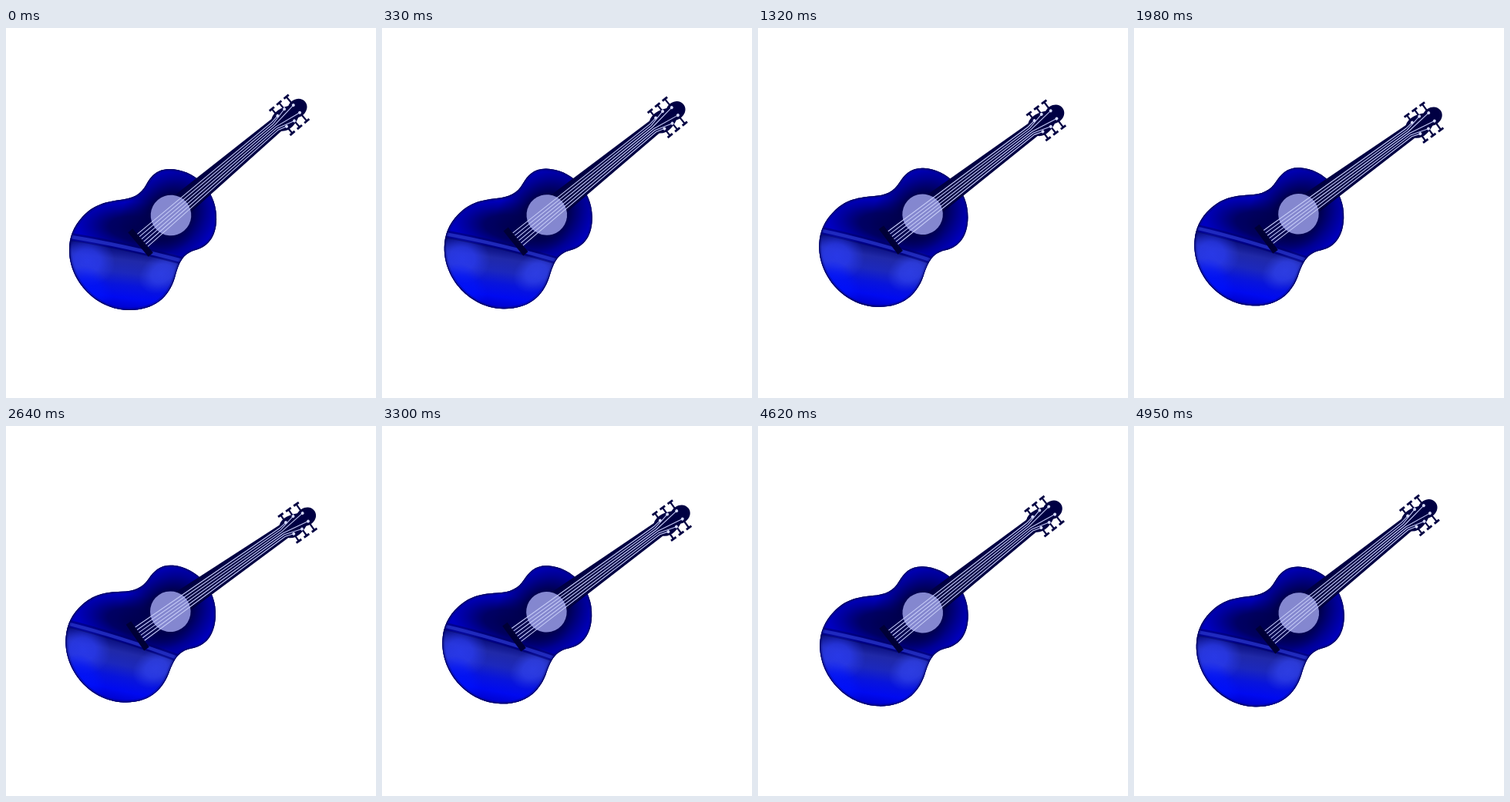
Write an HTML page with a canvas that moves like this. It is 480x480 px and loops after 5280 ms.

```html
<!DOCTYPE html>
<html lang="en">
<head>
<meta charset="utf-8">
<title>Swaying guitar</title>
<style>
html, body { margin: 0; width: 100%; height: 100%; overflow: hidden; background: #fff; }
canvas { display: block; width: 480px; height: 480px; }
</style>
</head>
<body>
<canvas id="stage" width="480" height="480"></canvas>
<script>
const ctx = document.getElementById('stage').getContext('2d');
const STEP = 330, STEPS = 16;
const PIVOT = { x: 238, y: 234 };
const HOLE = { x: 214, y: 243, r: 26.3 };
const NECK_ANGLE = -0.703;
const NAVY = '#000043';

const body = new Path2D(
  'M212 183 C196 183 188 192 182 203 C175 216 165 221 148 223 ' +
  'C125 226 112 231 99 245 C87 258 82 272 82 288 C82 329 118 366 160 366 ' +
  'C192 366 211 350 219 324 C224 306 228 293 246 288 ' +
  'C264 283 274 268 273 244 C272 209 243 183 212 183 Z');
const band = new Path2D('M78 270 Q150 281 236 304');
const gloss = new Path2D('M76 274 Q150 285 238 309 V380 H70 Z');
const neck = new Path2D('M10 -17 L184 -10.8 V9.2 L10 14 Z');
const head = new Path2D(
  'M180 -10.8 C188 -17 200 -14 208 -10 C216 -14 228 -10 228 0 ' +
  'C228 10 216 14 208 10 C200 14 188 17 180 9.2 Z');

// Soft ellipse; color is "r,g,b".
function blob(x, y, rx, ry, turn, color, alpha) {
  ctx.save();
  ctx.translate(x, y);
  ctx.rotate(turn);
  ctx.scale(rx, ry);
  const g = ctx.createRadialGradient(0, 0, 0, 0, 0, 1);
  g.addColorStop(0, `rgba(${color},${alpha})`);
  g.addColorStop(0.45, `rgba(${color},${alpha * 0.85})`);
  g.addColorStop(0.75, `rgba(${color},${alpha * 0.35})`);
  g.addColorStop(1, `rgba(${color},0)`);
  ctx.fillStyle = g;
  ctx.fillRect(-1, -1, 2, 2);
  ctx.restore();
}

function line(color, width, ...pts) {
  ctx.strokeStyle = color;
  ctx.lineWidth = width;
  ctx.beginPath();
  pts.forEach(p => ctx.lineTo(...p));
  ctx.stroke();
}

function disc(x, y, r, color) {
  ctx.fillStyle = color;
  ctx.beginPath();
  ctx.arc(x, y, r, 0, 7);
  ctx.fill();
}

function strokePath(path, color, width) {
  ctx.strokeStyle = color;
  ctx.lineWidth = width;
  ctx.stroke(path);
}

function drawGloss() {
  const shine = ctx.createLinearGradient(158, 285, 148, 366);
  ['#060a78', '#2029a8', '#1c28bc', '#0814dc', '#000af0', '#0000c8']
    .forEach((color, i, all) => shine.addColorStop(i / (all.length - 1), color));
  ctx.fillStyle = shine;
  ctx.fill(gloss);
  blob(106, 302, 36, 32, 0.3, '44,62,248', 0.75);
  blob(202, 318, 32, 24, -0.6, '50,68,240', 0.75);
  blob(110, 338, 34, 24, 0.8, '0,20,255', 0.6);
}

function drawBody() {
  ctx.save();
  ctx.clip(body);
  ctx.fillStyle = '#0000c0';
  ctx.fillRect(70, 170, 220, 210);
  blob(212, 244, 72, 58, -0.75, '0,0,60', 1);
  blob(168, 260, 76, 34, 0.1, '0,0,78', 0.95);
  drawGloss();
  strokePath(band, 'rgba(0,0,90,0.45)', 10);
  strokePath(band, 'rgba(40,54,205,0.75)', 4.5);
  strokePath(body, 'rgba(0,0,90,0.25)', 6);
  strokePath(body, '#000058', 2);
  ctx.restore();
}

// Three pegs per side, mirrored about the neck's axis.
function drawStrings() {
  for (const side of [-1, 1]) {
    for (let i = 0; i < 3; i++) {
      const x = 189 + 12.3 * i;
      const y = side * (9 + 3.3 * i - 2.3 * i * i);
      const cap = side * 20.6;
      const lane = side * (1 - 0.4 * i);
      line(NAVY, 2.2, [x, y], [x, cap]);
      line(NAVY, 2.8, [x - 4, cap], [x + 4, cap]);
      line('#c4caf6', 1.1, [-49, lane * 10.5 + 1], [178, lane * 6.5 - 1], [x, y]);
      disc(x, y, 2, '#d4d9fa');
    }
  }
}

// Neck coordinates: x runs towards the head, y across the strings.
function drawNeck() {
  ctx.save();
  ctx.translate(HOLE.x, HOLE.y);
  ctx.rotate(NECK_ANGLE);
  ctx.fillStyle = NAVY;
  ctx.fill(neck);
  ctx.fill(head);
  line('#000036', 8, [-53, -19], [-53, 22]);
  disc(0, 0, HOLE.r, 'rgba(154,158,230,0.86)');
  drawStrings();
  ctx.restore();
}

// Degrees from rest: a quick first step, then an even swing.
function tilt(k) {
  return k === 0 ? 0 : 1.32 + 0.57 * (k - 1);
}

function draw(now) {
  const i = Math.floor(now / STEP) % STEPS;
  const k = Math.min(i, STEPS - i);
  ctx.fillStyle = '#fff';
  ctx.fillRect(0, 0, 480, 480);
  ctx.save();
  ctx.translate(PIVOT.x, PIVOT.y);
  ctx.rotate(tilt(k) * Math.PI / 180);
  ctx.translate(-PIVOT.x, -PIVOT.y);
  drawBody();
  drawNeck();
  ctx.restore();
}

const start = performance.now();
function tick() {
  draw(performance.now() - start);
  requestAnimationFrame(tick);
}
tick();
</script>
</body>
</html>
```
